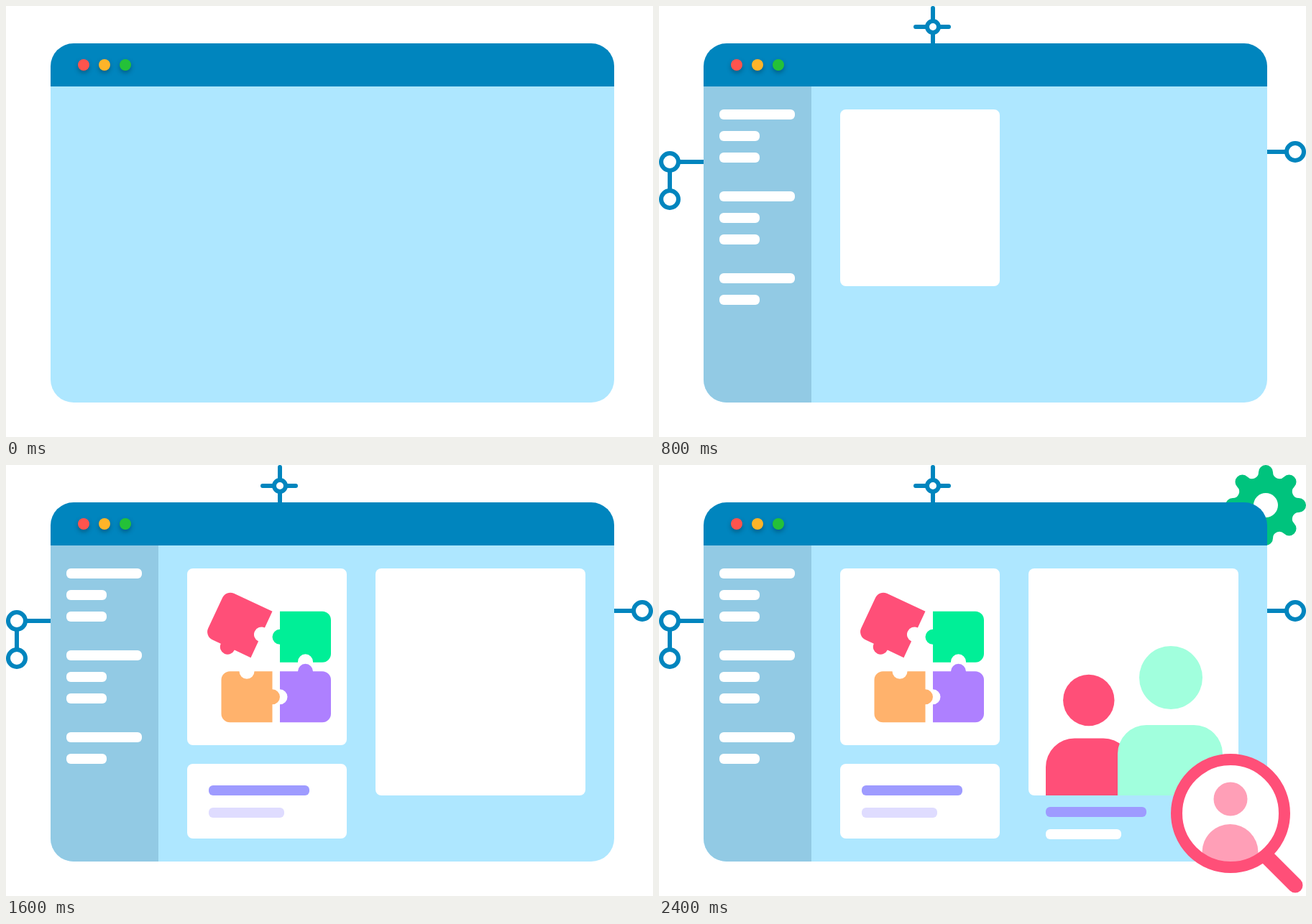
These frames come from a looping animation (900 px wide and 600 px high, 2600 ms). An HTML page:

```html
<!DOCTYPE html>
<html lang="en">
<head>
<meta charset="utf-8">
<title>App window build-up</title>
<style>
html, body { margin: 0; width: 100%; height: 100%; overflow: hidden; background: #fff; }
svg { display: block; width: 900px; height: 600px; }
.line { fill: #fff; stroke: #0085be; stroke-width: 6; }
.dots { filter: drop-shadow(0 3px 3px rgba(0, 0, 0, .3)); }
.pink { fill: #ff4f78; }
.mint { fill: #a1ffdd; }
.rose { fill: #ff9fb7; }
</style>
</head>
<body>
<svg viewBox="0 0 900 600">
  <!-- data-step: how many ticks pass before the group appears -->
  <g data-step="1" class="line">
    <path d="M15 217H70M15 217V269M885 203H840M381 29V60"/>
    <path d="M357 29H403M381 3V29" stroke-linecap="round"/>
    <circle cx="15" cy="217" r="12"/>
    <circle cx="15" cy="269" r="12"/>
    <circle cx="885" cy="203" r="12"/>
    <circle cx="381" cy="29" r="8"/>
  </g>
  <g data-step="12" transform="translate(844 56)">
    <path id="gear" fill="#00c37d"/>
    <circle r="17" fill="#fff"/>
  </g>

  <path d="M62 112H846V520a32 32 0 0 1-32 32H94a32 32 0 0 1-32-32z" fill="#aee7ff"/>
  <path d="M62 112V84a32 32 0 0 1 32-32H814a32 32 0 0 1 32 32V112z" fill="#0085be"/>
  <g class="dots">
    <circle cx="108" cy="82" r="8" fill="#ff544d"/>
    <circle cx="137" cy="82" r="8" fill="#feb429"/>
    <circle cx="166" cy="82" r="8" fill="#24c138"/>
  </g>

  <path data-step="2" d="M62 112H212V552H94a32 32 0 0 1-32-32z" fill="#92cae4"/>
  <g data-step="3" id="menu"></g>

  <rect data-step="4" x="252" y="144" width="222" height="246" rx="8" fill="#fff"/>
  <g data-step="5">
    <path fill="#00ef97" d="M381 203.8h59a12 12 0 0 1 12 12v47a12 12 0 0 1-12 12h-13v-1a10.5 10.5 0 0 0-21 0v1h-25v-25a10.5 10.5 0 0 1 0-21z"/>
    <path fill="#ae80ff" d="M381 287.3h25a10.5 10.5 0 0 1 21 0h13a12 12 0 0 1 12 12v47a12 12 0 0 1-12 12h-59v-25a10.5 10.5 0 0 0 0-21z"/>
    <path fill="#ffb26c" d="M370.5 358.3h-59a12 12 0 0 1-12-12v-47a12 12 0 0 1 12-12h13a10.5 10.5 0 0 0 21 0h25v25a10.5 10.5 0 0 1 0 21z"/>
    <path class="pink" transform="rotate(25 370.5 203.8)" d="M370.5 203.8v25a10.5 10.5 0 0 0 0 21v25h-25a10.5 10.5 0 0 1-21 0h-13a12 12 0 0 1-12-12v-47a12 12 0 0 1 12-12z"/>
  </g>

  <rect data-step="6" x="252" y="416" width="222" height="104" rx="8" fill="#fff"/>
  <g data-step="7" id="note"></g>

  <rect data-step="8" x="514" y="144" width="292" height="316" rx="8" fill="#fff"/>
  <g data-step="9">
    <circle class="pink" cx="597.8" cy="327.5" r="35.7"/>
    <path class="pink" d="M538 460V420.5a40 40 0 0 1 40-40h40a40 40 0 0 1 40 40V460z"/>
    <circle class="mint" cx="712" cy="296" r="44"/>
    <path class="mint" d="M638 460V402a40 40 0 0 1 40-40h66a40 40 0 0 1 40 40V460z"/>
  </g>
  <g data-step="10" id="caption"></g>

  <g data-step="11">
    <path d="M843 543L885 585" stroke="#ff4f78" stroke-width="21" stroke-linecap="round"/>
    <circle cx="795" cy="485" r="75" fill="#fff"/>
    <circle class="rose" cx="795" cy="465" r="23.5"/>
    <path class="rose" d="M755.5 552V539a39 39 0 0 1 78 0V552z"/>
    <circle cx="795" cy="485" r="75" fill="none" stroke="#ff4f78" stroke-width="16"/>
  </g>
</svg>
<script>
const TICK = 200, LOOP = 2600;
const el = id => document.getElementById(id);
const bar = (x, y, w, fill) =>
  `<rect x="${x}" y="${y}" width="${w}" height="14" rx="6" fill="${fill}"/>`;

// Menu sections: one heading, then short entries
let menu = '', y = 144;
for (const entries of [2, 2, 1]) {
  menu += bar(84, y, 105, '#fff');
  for (let i = 1; i <= entries; i++) menu += bar(84, y + 30 * i, 56, '#fff');
  y += 30 * entries + 54;
}
el('menu').innerHTML = menu;
el('note').innerHTML = bar(282, 446, 140, '#9e9bff') + bar(282, 477, 105, '#dfdcff');
el('caption').innerHTML = bar(538, 476, 140, '#9e9bff') + bar(538, 507, 105, '#fff');

// Eight round teeth joined by round valleys
const spin = (x, y, a) =>
  [x * Math.cos(a) - y * Math.sin(a), x * Math.sin(a) + y * Math.cos(a)];
let gear = '';
for (let i = 0; i < 8; i++) {
  const a = i * Math.PI / 4;
  gear += `${i ? 'A9 9 0 0 0 ' : 'M'}${spin(46, -10, a)}A10 10 0 0 1 ${spin(46, 10, a)}`;
}
el('gear').setAttribute('d', gear + `A9 9 0 0 0 ${spin(46, -10, 0)}z`);

const steps = document.querySelectorAll('[data-step]');
const start = performance.now();
function draw(now) {
  const t = Math.max(0, now - start) % LOOP;
  for (const s of steps)
    s.style.visibility = t >= s.dataset.step * TICK ? 'visible' : 'hidden';
  requestAnimationFrame(draw);
}
draw(start);
</script>
</body>
</html>
```
